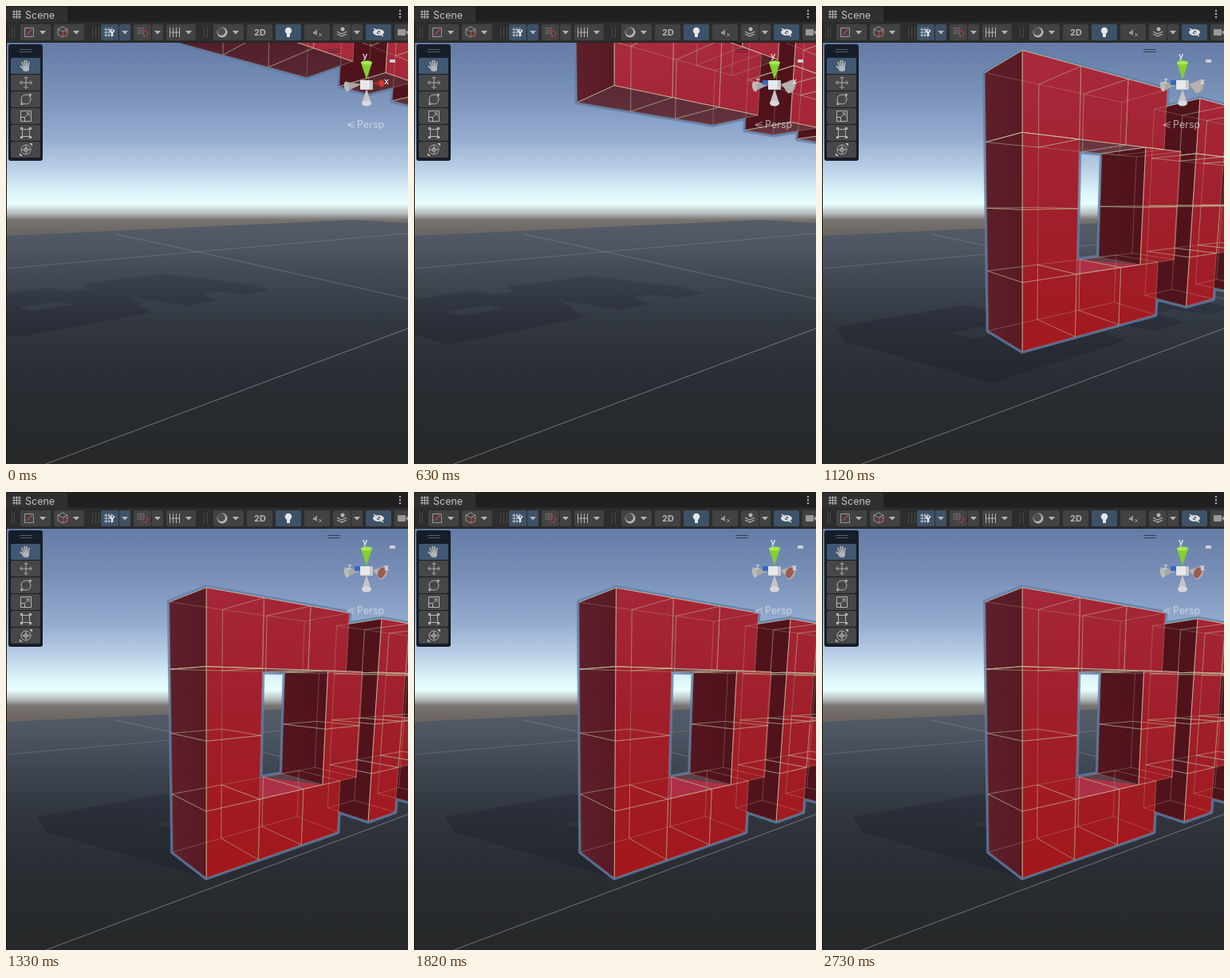
Animation, 504 px wide and 574 px high, one loop 3.36 s. Source, as an HTML page with a canvas:

```html
<!DOCTYPE html>
<html>
<head>
<meta charset="utf-8">
<style>
  html, body { margin: 0; width: 100%; height: 100%; overflow: hidden; background: #222; }
  canvas { display: block; }
</style>
</head>
<body>
<canvas id="stage" width="504" height="574"></canvas>
<script>
const ctx = document.getElementById('stage').getContext('2d');
const LOOP = 3360, STEP = 70;

// Camera: 60 degree view, pitched slightly down, blocks turned by 56 degrees.
const FOCAL = 460, CX = 251.2, CY = 309.6, EYE = 2.751, DIST = 4.96;
const SIN_P = 0.1444, COS_P = 0.9895, SIN_Y = 0.829, COS_Y = 0.559;
const SHADOW_U = -0.396, SHADOW_W = 0.766;

// Unit blocks of the two letters as [along, up].
const BLOCKS = [];
for (let v = 0; v < 4; v++) {
  const row = v % 3 ? [0, 2.5] : [0, 1, 2];
  row.push(4, 6);
  if (v % 2) row.push(5);
  row.forEach(u => BLOCKS.push([u, v]));
}

let lift = 0, lean = 0;

function project(u, v, w) {
  const x = u * SIN_Y - w * COS_Y, y = v - EYE, z = DIST + u * COS_Y + w * SIN_Y;
  const depth = z * COS_P - y * SIN_P;
  return [CX + FOCAL * x / depth, CY - FOCAL * (y * COS_P + z * SIN_P) / depth];
}
const corner = (u, v, w) => project(u + lean * v, v + lift, w);

function trace(points, close) {
  points.forEach(([x, y], i) => i ? ctx.lineTo(x, y) : ctx.moveTo(x, y));
  if (close) ctx.closePath();
}
function poly(points, fill) {
  ctx.beginPath();
  trace(points, true);
  ctx.fillStyle = fill;
  ctx.fill();
}
function line(points, color, width = 1) {
  ctx.beginPath();
  trace(points);
  ctx.strokeStyle = color;
  ctx.lineWidth = width;
  ctx.stroke();
}
function rect(x, y, w, h, fill, r = 0) {
  ctx.beginPath();
  ctx.roundRect(x, y, w, h, r);
  ctx.fillStyle = fill;
  ctx.fill();
}
function ring(x, y, r, color, width = 1) {
  ctx.beginPath();
  ctx.arc(x, y, r, 0, 7);
  ctx.strokeStyle = color;
  ctx.lineWidth = width;
  ctx.stroke();
}
function disc(x, y, rx, ry, fill, turn = 0) {
  ctx.beginPath();
  ctx.ellipse(x, y, rx, ry, turn, 0, 7);
  ctx.fillStyle = fill;
  ctx.fill();
}
function text(str, x, y, size, color, weight = 400) {
  ctx.font = `${weight} ${size}px Inter, sans-serif`;
  ctx.fillStyle = color;
  ctx.fillText(str, x, y);
}
function fillStops(g, from, to, stops) {
  stops.forEach(([at, color]) => g.addColorStop((at - from) / (to - from), color));
  return g;
}
const vertical = (y0, y1, ...stops) => fillStops(ctx.createLinearGradient(0, y0, 0, y1), y0, y1, stops);
const horizontal = (x0, x1, ...stops) => fillStops(ctx.createLinearGradient(x0, 0, x1, 0), x0, x1, stops);

const sky = vertical(47, 290, [47, '#657da6'], [110, '#7a92b9'], [165, '#95acd0'], [205, '#bbd1e7'],
  [235, '#def5fa'], [248, '#e9ffff'], [260, '#b5bdbd'], [268, '#77736f'], [290, '#69625e']);
const floor = vertical(268, 574, [268, '#555d69'], [300, '#4d5662'], [340, '#404853'],
  [400, '#31373f'], [480, '#292c31'], [574, '#262829']);
const shade = vertical(270, 470, [270, 'rgba(40,46,60,0)'], [330, 'rgba(40,46,60,.25)'],
  [400, 'rgba(30,34,46,.42)'], [470, 'rgba(26,30,38,.42)']);
const front = vertical(48, 480, [48, '#a82a3c'], [270, '#a01f2c'], [480, '#a2171a']);
const side = horizontal(200, 400, [200, '#5e202c'], [251, '#581923'], [400, '#50131c']);
const under = vertical(48, 270, [48, '#51202a'], [160, '#653440'], [270, '#7c4552']);

function drawGround() {
  rect(0, 46, 504, 528, sky);
  const edge = [[0, 288], [435, 268], [504, 272], [504, 574], [0, 574]];
  poly(edge, floor);
  ctx.save();
  ctx.beginPath();
  trace(edge, true);
  ctx.clip();
  ctx.beginPath();
  for (const [u, v] of BLOCKS) {
    const at = (du, dw, h) => project(u + du + SHADOW_U * h, 0, dw + SHADOW_W * h);
    const low = lift + v, high = low + 1;
    trace([at(0, 0, low), at(1, 0, low), at(1, 1, low), at(1, 1, high), at(0, 1, high), at(0, 0, high)], true);
  }
  ctx.fillStyle = shade;
  ctx.fill();
  ctx.restore();
  line([[0, 329], [504, 285]], 'rgba(150,156,162,.33)');
  line([[138, 286], [240, 308], [504, 367]], 'rgba(150,156,162,.4)');
  line([[50, 574], [504, 404]], 'rgba(160,165,168,.6)');
}

function blockFaces(u, v) {
  const c = (du, dv, dw) => corner(u + du, v + dv, dw);
  const y = v + lift - EYE;
  const faces = [];
  if (y > 0) faces.push([[c(0, 0, 0), c(1, 0, 0), c(1, 0, 1), c(0, 0, 1)], under]);
  if (y < -1) faces.push([[c(0, 1, 0), c(1, 1, 0), c(1, 1, 1), c(0, 1, 1)], '#ad3047']);
  faces.push([[c(0, 0, 0), c(0, 1, 0), c(0, 1, 1), c(0, 0, 1)], side]);
  faces.push([[c(0, 0, 0), c(1, 0, 0), c(1, 1, 0), c(0, 1, 0)], front]);
  return faces;
}

function drawBlocks() {
  const fromEye = v => Math.abs(v + 0.5 + lift - EYE);
  const sorted = [...BLOCKS].sort((a, b) => fromEye(b[1]) - fromEye(a[1]) || b[0] - a[0]);

  ctx.lineJoin = 'round';
  ctx.beginPath();
  for (const [u, v] of sorted) blockFaces(u, v).forEach(([points]) => trace(points, true));
  ctx.strokeStyle = 'rgba(92,128,174,.8)';
  ctx.lineWidth = 6;
  ctx.stroke();

  const bright = 'rgba(228,240,196,.8)', thin = 0.75;
  for (const [u, v] of sorted) {
    for (const [points, fill] of blockFaces(u, v)) {
      poly(points, fill);
      line([...points, points[0]], fill, 0.6);
    }
    if (u === 2 && v === 0 && lift < 1.7)
      poly([corner(2.5, 1, 0), corner(1.98, 1, 1), corner(2.5, 1, 1)], '#59424a');
    line([corner(u, v, 0), corner(u, v + 1, 0)], bright, thin);
    line([corner(u, v + 1, 1), corner(u, v + 1, 0), corner(u + 1, v + 1, 0)], bright, thin);
    if (v + lift > EYE) line([corner(u, v, 1), corner(u, v, 0), corner(u + 1, v, 0)], bright, thin);
  }

  ctx.beginPath();
  for (const [u, v] of BLOCKS) {
    for (const w of [0, 1])
      trace([corner(u, v, w), corner(u + 1, v, w), corner(u + 1, v + 1, w), corner(u, v + 1, w)], true);
    for (const [du, dv] of [[0, 0], [0, 1], [1, 0], [1, 1]])
      trace([corner(u + du, v + dv, 0), corner(u + du, v + dv, 1)]);
  }
  ctx.strokeStyle = 'rgba(190,212,165,.3)';
  ctx.lineWidth = 0.9;
  ctx.stroke();
}

function drawGizmo(early) {
  poly([[452, 92], [445, 71], [459, 71]], '#86cf30');
  disc(452, 71, 7, 2.5, '#a5ec52');
  poly([[452, 104], [446, 122], [458, 122]], '#c4c4c4');
  disc(452, 122, 6, 3.5, '#d9d9d9');
  poly([[446, 98], [427, 95], [427, 107]], '#a7a7a3');
  disc(427, 101, 3, 6.5, '#bbbbb7', -0.2);
  if (early) {
    poly([[459, 97], [472, 92], [472, 101]], '#a92821');
    disc(471, 97, 3, 4.5, '#cf3d31');
  } else {
    rect(437, 93, 8, 6, '#3568c8');
    poly([[460, 98], [471, 94], [470, 110]], '#b5b0ad');
    disc(472, 101, 6, 8.5, '#b0aaa7', 0.4);
    disc(471, 101, 4.5, 7, lift > 0 ? '#b8b0ae' : '#9c5a55', 0.4);
    text('z', 428, 97, 10, '#e0e0e0', 500);
  }
  rect(444, 93, 16, 12, '#c6c9cc', 1);
  rect(444, 93, 12, 11, '#e6e8e9', 1);
  text('y', 447, 66, 11, '#f2f2f2', 500);
  text('x', 474, 98, 11, '#f2f2f2', 500);
  for (const dy of [-4, 0, 4]) line([[437, 149 + dy], [428, 149]], 'rgba(230,230,230,.6)');
  text('Persp', 440, 153, 12.5, 'rgba(232,235,238,.68)');
  rect(481, 67, 7, 4, '#c9ced6');
  for (const y of [54.5, 57.5]) line([[403, y], [419, y]], 'rgba(35,40,48,.75)');
}

const ICON = '#b4b4b4', BUTTON = '#424242', ACTIVE = '#3d5268';
const arrow = x => poly([[x - 4, 31], [x + 4, 31], [x, 35.5]], ICON);

function gridIcon(x, y, size, color) {
  for (const k of [0.2, 0.5, 0.8]) {
    line([[x + size * k, y], [x + size * k, y + size]], color);
    line([[x, y + size * k], [x + size, y + size * k]], color);
  }
}

function drawToolbar() {
  rect(0, 0, 504, 20, '#202020');
  rect(0, 1, 77, 20, '#303030', [3, 3, 0, 0]);
  rect(0, 20, 504, 26, '#2d2d2d');
  rect(0, 45, 504, 1, '#202020');
  gridIcon(8, 5, 11, ICON);
  text('Scene', 24, 16, 12.5, '#c4c4c4');
  for (const y of [6, 10, 14]) disc(494, y, 1.2, 1.2, ICON);
  for (const x of [7.5, 10.5, 108.5, 112.5, 116.5, 248.5, 252.5]) line([[x, 26], [x, 40]], '#484848');

  const buttons = [[18, 38], [60, 38], [119, 22, 1], [142, 14, 1], [160, 22], [183, 14], [201, 37],
    [260, 38], [302, 32], [338, 32, 1], [374, 32], [410, 22], [433, 14], [451, 32, 1], [487, 20]];
  for (const [x, w, on] of buttons) rect(x, 23, w, 20, on ? ACTIVE : BUTTON, 2);
  [46, 88, 149, 190, 229, 288, 440].forEach(arrow);

  ctx.strokeStyle = '#999';
  ctx.lineWidth = 1;
  ctx.strokeRect(23.5, 27.5, 11, 11);
  line([[26, 36], [33, 29]], '#c04a3c', 1.3);
  line([[71, 26], [77, 29], [77, 36], [71, 39], [65, 36], [65, 29], [71, 32], [77, 29]], '#999');
  line([[65, 29], [71, 26]], '#999');
  ring(74, 35, 3, '#b8483c', 1.2);
  gridIcon(123, 27, 12, '#b8c0c8');
  text('Y', 129, 38, 11, '#f0f0f0', 700);
  gridIcon(164, 26, 10, '#666');
  line([[170, 31], [176, 31], [178, 34], [176, 38], [170, 38]], '#93443d', 1.6);
  for (const x of [205.5, 209.5, 213.5, 217.5]) line([[x, 27], [x, 39]], ICON);
  line([[205, 33], [217, 33]], ICON);
  disc(271, 33, 6.5, 6.5, ICON);
  disc(270, 32, 5, 5, '#505050');
  text('2D', 311, 37, 11, ICON, 700);
  disc(354, 31, 4.2, 4.2, '#e6e6e6');
  rect(352, 34, 4, 5, '#e6e6e6', 1);
  poly([[385, 32], [387, 32], [390, 29], [390, 37], [387, 35], [385, 35]], '#969696');
  line([[392, 34], [396, 38]], '#969696');
  line([[396, 34], [392, 38]], '#969696');
  for (const y of [32, 35]) line([[415, y], [421, y + 3], [427, y]], ICON, 1.3);
  disc(422, 29, 2.5, 2.5, ICON);
  disc(467, 33, 7, 4, '#dedede');
  disc(467, 33, 2.2, 2.2, ACTIVE);
  line([[461, 28], [473, 38]], '#dedede', 1.4);
  rect(491, 29, 10, 8, '#999', 1);
  poly([[501, 33], [504, 30], [504, 36]], '#999');
}

function drawTools() {
  rect(3, 48, 43, 146, '#171d28', 3);
  for (const y of [54.5, 57.5]) line([[17, y], [33, y]], '#565c66');
  for (let i = 0; i < 6; i++) rect(6, 65 + 21 * i, 37, 20, i ? '#474747' : '#405873', 2);

  rect(21, 75, 8, 7, ICON, 3);
  for (const [x, y] of [[20, 70], [23, 68], [26, 68], [29, 70]]) line([[x, y], [23 + (x - 20) / 2, 78]], ICON, 1.7);
  line([[18, 75], [22, 79]], ICON, 2);

  line([[18, 96], [32, 96]], ICON);
  line([[25, 89], [25, 103]], ICON);
  for (const s of [-1, 1]) {
    line([[25 + 5 * s, 93.5], [25 + 7.5 * s, 96], [25 + 5 * s, 98.5]], ICON);
    line([[22.5, 96 + 5 * s], [25, 96 + 7.5 * s], [27.5, 96 + 5 * s]], ICON);
  }

  ring(25, 117, 6, ICON);
  poly([[28, 110], [32, 110], [31, 114]], ICON);
  poly([[22, 124], [18, 124], [19, 120]], ICON);

  ctx.strokeStyle = ICON;
  ctx.strokeRect(18.5, 131.5, 13, 13);
  ctx.strokeRect(18.5, 139.5, 5, 5);
  line([[24, 139], [29, 134], [25, 134]], ICON);
  line([[29, 134], [29, 138]], ICON);

  ctx.strokeRect(20.5, 154.5, 9, 9);
  for (const x of [18, 29]) for (const y of [152, 163]) rect(x, y, 3, 3, ICON);

  ring(25, 180, 6, ICON);
  line([[20, 180], [30, 180]], ICON);
  line([[25, 175], [25, 185]], ICON);
  ring(25, 180, 2.5, ICON);
  poly([[29, 172], [33, 172], [33, 176]], ICON);
  poly([[21, 188], [17, 188], [17, 184]], ICON);
}

function render(now) {
  const time = Math.floor(now % LOOP / STEP) * STEP;
  const fall = Math.max(0, time / 1000 - 0.24);
  lift = Math.max(0, 5.07 - 5.75 * fall * fall);
  // A slight rock after landing.
  const rock = Math.min(1, Math.max(0, (time - 1400) / 840));
  lean = 0.007 * Math.sin(Math.PI * rock) ** 2;

  drawGround();
  drawBlocks();
  drawGizmo(time < 350);
  drawToolbar();
  drawTools();
  rect(0, 20, 1, 554, '#151515');
  requestAnimationFrame(() => render(performance.now() - start));
}
const start = performance.now();
render(0);
</script>
</body>
</html>
```
